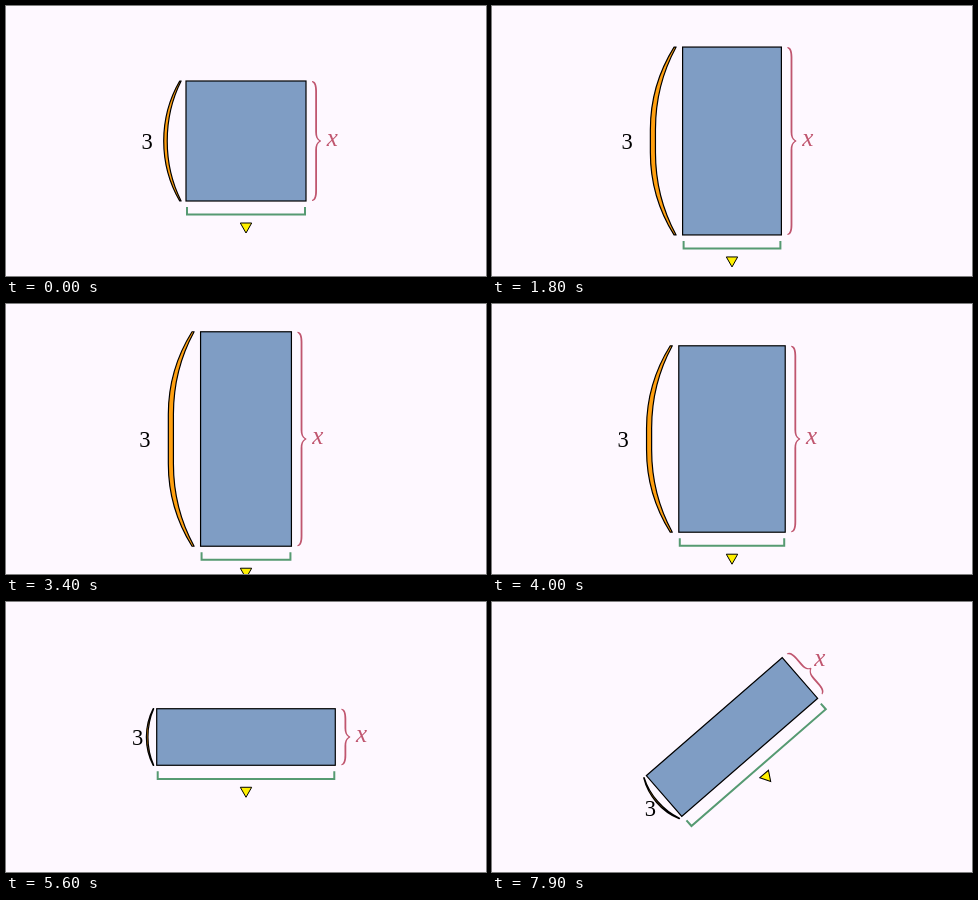
An HTML page for the animation above (8000 ms loop, 480 by 270 pixels).

```html
<!DOCTYPE html>
<html lang="en">
<head>
<meta charset="utf-8">
<title>Stretching and turning a labelled box</title>
<style>
  html, body { margin: 0; width: 100%; height: 100%; overflow: hidden; background: #fef8ff; }
  svg { display: block; width: 480px; height: 270px; }
  .line { stroke: #000; stroke-width: 1.2; }
  #box { fill: #7f9dc4; }
  #arc { fill: #ffa010; stroke-linejoin: round; }
  #brace { fill: #c0566f; }
  #bracket { fill: none; stroke: #569a72; stroke-width: 2; }
  #marker { fill: #fff000; stroke-width: 1; }
  text { font-family: "Liberation Serif", "Times New Roman", serif; text-anchor: middle; }
  #three { font-size: 22.5px; }
  #ex { font-size: 25px; font-style: italic; fill: #c0566f; }
</style>
</head>
<body>
<svg viewBox="0 0 480 270">
  <g transform="translate(240 135)">
    <g id="figure">
      <rect id="box" class="line"/>
      <path id="arc" class="line"/>
      <path id="brace"/>
      <path id="bracket"/>
      <path id="marker" class="line" d="M-5.7 22H5.7L0 32Z"/>
    </g>
    <text id="three">3</text>
    <text id="ex">x</text>
  </g>
</svg>
<script>
const LOOP = 8000, RUN = 2850;
const el = id => document.getElementById(id);
const [figure, box, arc, brace, bracket, marker, three, ex] =
  ["figure", "box", "arc", "brace", "bracket", "marker", "three", "ex"].map(el);

const set = (node, attrs) => {
  for (const key in attrs) node.setAttribute(key, attrs[key]);
};

// Quintic ease in and out, beginning at the given time
const ease = (t, start) => {
  const x = Math.min(1, Math.max(0, (t - start) / RUN));
  return x * x * x * (10 - 15 * x + 6 * x * x);
};

// The bow deepens with height up to a limit, then gains a straight middle
function arcPath(w, h, size) {
  const depth = 0.158 * (size - 10);
  const tip = -w / 2 - 0.03 * size - 1.3;
  const outer = tip - depth;
  const inner = outer + 0.19 * depth + 0.2;
  const cut = 0.08 * depth;
  const top = h / 2;
  const mid = Math.max(0, h - 165) / 2;
  const bend = top - 0.46 * (top - mid);
  return `M${tip - cut} ${-top}Q${outer} ${-bend} ${outer} ${-mid}V${mid}` +
    `Q${outer} ${bend} ${tip - cut} ${top}L${tip} ${top}` +
    `Q${inner} ${bend} ${inner} ${mid}V${-mid}Q${inner} ${-bend} ${tip} ${-top}Z`;
}

function bracePath(w, h) {
  const half = sign => {
    const p = (x, y) => `${w / 2 + x} ${sign * y} `;
    const e = h / 2;
    return "M" + p(6, e) + "C" + p(9.5, e) + p(11, e - 4) + p(11, e - 10) +
      "L" + p(11, 9) + "C" + p(11, 4) + p(12, 1.8) + p(14.9, 0.5) +
      "L" + p(14.9, 0) + "L" + p(13.2, 0) +
      "C" + p(10.6, 2) + p(9.2, 4.5) + p(9.2, 9) +
      "L" + p(9.2, e - 10) + "C" + p(9.2, e - 5) + p(8.4, e - 2) + p(6, e - 0.9) + "Z";
  };
  return half(-1) + half(1);
}

function draw(t) {
  const grow = ease(t, 50), squash = ease(t, 3105), turn = 60 * ease(t, 6190);
  const w = 120 - 30 * grow + 90 * squash;
  const h = 120 + 96 * grow - 162 * squash;
  const size = Math.min(h, 173);
  const side = w / 2 - 1, base = h / 2;

  set(figure, { transform: `rotate(${-turn})` });
  set(box, { x: -w / 2, y: -base, width: w, height: h });
  set(arc, { d: arcPath(w, h, size) });
  set(brace, { d: bracePath(w, h) });
  set(bracket, { d: `M${-side} ${base + 6}V${base + 13.6}H${side}V${base + 6}` });
  set(marker, { transform: `translate(0 ${base})` });

  // Labels follow the turn but stay upright
  const c = Math.cos(turn * Math.PI / 180), s = Math.sin(turn * Math.PI / 180);
  const left = -w / 2 - 0.314 * size - 1.3, right = w / 2 + 26.3;
  set(three, { x: left * c, y: -left * s + 7.8 });
  set(ex, { x: right * c, y: -right * s + 5.4 });
}

const begin = performance.now();
function tick() {
  draw((performance.now() - begin) % LOOP);
  requestAnimationFrame(tick);
}
tick();
</script>
</body>
</html>
```
